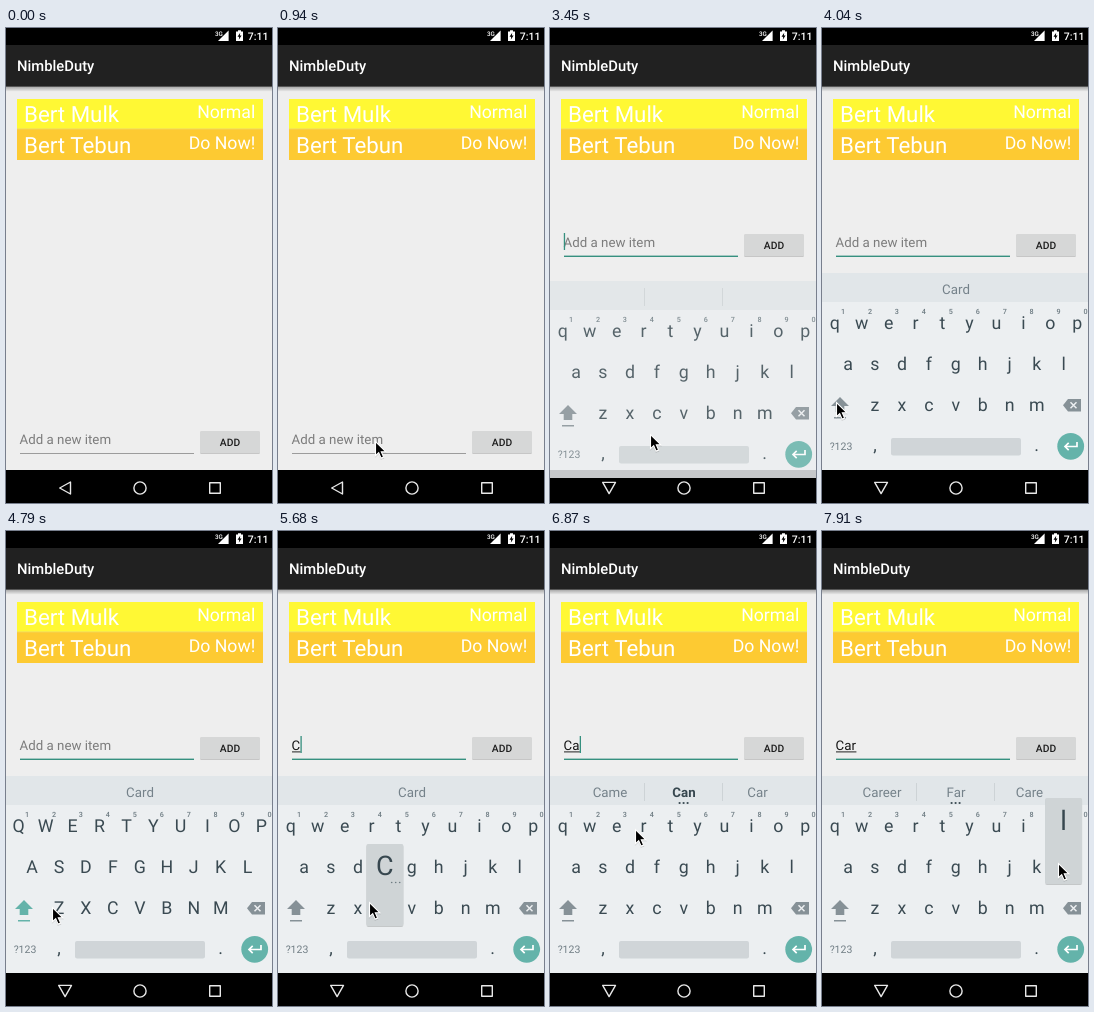
An HTML page that plays this animation: 266x475 px, repeating every 8000 ms.

```html
<!DOCTYPE html>
<html lang="en">
<head>
<meta charset="utf-8">
<title>To-do list</title>
<style>
  html, body { margin: 0; width: 100%; height: 100%; overflow: hidden; background: #eee; }
  svg { display: block; width: 100vw; height: 100vh; font-family: Roboto, "Noto Sans", sans-serif; text-rendering: geometricPrecision; }
  .mid { text-anchor: middle; }
  .end { text-anchor: end; }
  .med { font-weight: 500; }
  .key { font-size: 17.8px; fill: #3a4a52; text-anchor: middle; }
  .digit { font-size: 7.2px; font-weight: 500; fill: #6c7a81; text-anchor: middle; }
  .hint { font-size: 13.3px; fill: #75828a; text-anchor: middle; }
  .nav { fill: none; stroke: #e8e8e8; stroke-width: 1.4; stroke-linejoin: round; }
</style>
</head>
<body>
<svg viewBox="0 0 266 475" preserveAspectRatio="none">
  <defs>
    <linearGradient id="shade" x2="0" y2="1">
      <stop stop-color="#000" stop-opacity=".3"/>
      <stop offset="1" stop-color="#000" stop-opacity="0"/>
    </linearGradient>
    <filter id="soft" x="-20%" y="-20%" width="140%" height="140%">
      <feDropShadow dx="0" dy=".6" stdDeviation=".7" flood-opacity=".28"/>
    </filter>
  </defs>
  <rect width="266" height="475" fill="#eee"/>

  <!-- status and title bars -->
  <rect width="266" height="18" fill="#000"/>
  <rect y="17" width="266" height="41.7" fill="#212121"/>
  <rect y="58.7" width="266" height="5" fill="url(#shade)"/>
  <g fill="#fff">
    <path d="M222.6 2.5V13H212Z"/>
    <text class="med" x="209" y="7.6" font-size="6.3">3G</text>
    <path d="M230 3.5H232V2.2H235V3.5H237V13H230Z"/>
    <path d="M234.2 4.8L231.5 8.8H233.2L232.8 11.8L235.6 7.6H233.9Z" fill="#000"/>
    <text class="med" x="241.7" y="12" font-size="10.5">7:11</text>
    <text class="med" x="11" y="43" font-size="14.8">NimbleDuty</text>
  </g>

  <!-- list -->
  <rect x="11" y="71" width="246" height="30" fill="#fff834"/>
  <rect x="11" y="101" width="246" height="31" fill="#fdca32"/>
  <rect x="11" y="100.5" width="246" height=".8" fill="#eed86a"/>
  <g fill="#fff">
    <g font-size="22.3"><text x="18" y="94.4">Bert Mulk</text><text x="18" y="125.2">Bert Tebun</text></g>
    <g class="end" font-size="17.7"><text x="249.3" y="90">Normal</text><text x="249.3" y="120.8">Do Now!</text></g>
  </g>

  <!-- entry row -->
  <g id="entry">
    <text id="holder" x="13.6" y="415.8" font-size="13.3" fill="#7c7c7c">Add a new item</text>
    <text id="typed" x="13.6" y="415.8" font-size="13.3" fill="#161616"></text>
    <rect id="compose" x="14" y="417.4" height="1" fill="#222"/>
    <rect id="caret" y="402" width="1.3" height="17" fill="#36907f"/>
    <rect id="line" x="14" width="174"/>
    <rect x="194" y="403" width="60" height="22" rx="1.5" fill="#d6d7d7" filter="url(#soft)"/>
    <text class="mid med" x="224" y="418" font-size="10.3" fill="#1c1c1c">ADD</text>
  </g>

  <!-- navigation bar -->
  <rect y="442" width="266" height="33" fill="#000"/>
  <path id="back" class="nav"/>
  <circle class="nav" cx="134" cy="460" r="6.1"/>
  <rect class="nav" x="203.7" y="454.7" width="10.6" height="10.6"/>

  <!-- keyboard -->
  <g id="board">
    <rect y="245" width="266" height="197" fill="#eceff1"/>
    <rect y="245" width="266" height="29" fill="#e1e6e9"/>
    <path id="split" d="M94.5 252V270M172.5 252V270" stroke="#cdd3d6"/>
    <g id="hints"></g>
    <g id="more" fill="#3a4a52"><circle cx="129.6" cy="272" r="1.1"/><circle cx="133.6" cy="272" r="1.1"/><circle cx="137.6" cy="272" r="1.1"/></g>
    <rect id="press" x="1" y="360" width="34" height="36" fill="#d3d9dc"/>
    <g id="keys"></g>
    <path id="shift" d="M18 369L27 378H22.3V384H13.7V378H9ZM12 389H24V390.4H12Z"/>
    <path d="M241 377.3L246 371H259V383.6H246Z" fill="#869197"/>
    <path d="M248.5 374.3L254.5 380.3M254.5 374.3L248.5 380.3" stroke="#eceff1" stroke-width="1.5"/>
    <text class="mid" x="19" y="422" font-size="10.5" fill="#717e85">?123</text>
    <text class="key" x="53" y="423.3">,</text>
    <rect x="69" y="410" width="130" height="17.5" rx="2" fill="#d0d5d8"/>
    <text class="key" x="214.5" y="423.3">.</text>
    <circle cx="248.7" cy="418.3" r="13.4" fill="#64b3aa"/>
    <path d="M255 414V418.5H243M246.7 414.8L243 418.5L246.7 422.2" fill="none" stroke="#fff" stroke-width="1.7"/>
  </g>

  <g id="popup">
    <rect id="bubble" width="37" rx="2" fill="#cfd4d6" filter="url(#soft)"/>
    <text id="big" class="mid" font-size="27" fill="#37474f"></text>
    <g id="dots" fill="#6c7a81"><circle cx="-4" r=".8"/><circle r=".8"/><circle cx="4" r=".8"/></g>
  </g>

  <path id="pointer" d="M0 0V14L3.2 11L5.600 16.500L8.100 15.500L5.800 10.100H10.200Z" fill="#000" stroke="#fff" stroke-width="1.100" filter="url(#soft)"/>
</svg>
<script>
const LOOP = 8000, START = 1955, STEP = 148.75;
const ROWS = ["qwertyuiop", "asdfghjkl", "zxcvbnm"];
const ROW_X = [12.7, 26, 53], PITCH = 26.95, ROW_H = 41;
const el = id => document.getElementById(id);
const show = (id, on) => el(id).setAttribute("visibility", on ? "inherit" : "hidden");

function set(id, attrs) {
  for (const name in attrs) el(id).setAttribute(name, attrs[name]);
}

function addText(parent, cls, x, y, text) {
  const node = document.createElementNS("http://www.w3.org/2000/svg", "text");
  node.setAttribute("class", cls);
  node.setAttribute("x", x);
  node.setAttribute("y", y);
  node.textContent = text;
  el(parent).append(node);
  return node;
}

const keys = ROWS.flatMap((row, r) => [...row].map((letter, i) => {
  const x = ROW_X[r] + PITCH * i;
  if (r === 0) addText("keys", "digit", x + 8.3, 286.3, (i + 1) % 10);
  return { letter, x, r, node: addText("keys", "key", x, 301.4 + ROW_H * r, letter) };
}));
const hints = [60, 134, 207.5].map(x => addText("hints", "hint", x, 265.6, ""));

// Pointer path: step, x, y
const PATH = [
  [-1, 97, 413], [4, 139, 402], [8, 139, 402], [10, 100, 406], [14, 14, 374],
  [17, 14, 374], [19, 46, 376], [22, 91, 371], [26, 91, 371], [29, 22, 332],
  [31, 22, 332], [33, 85, 298], [34, 89, 294], [36, 89, 294], [39, 236, 332], [40, 236, 332]
];
// Step of press, letter on the key, letter in the bubble
const PRESSES = [[24, "c", "C"], [29, "a", "a"], [35, "r", "r"], [40, "l", "l"]];
const TYPED = [[25, "C"], [30, "Ca"], [36, "Car"]];
const HINTS = [
  [0, ["", "", ""]], [12, ["", "Card", ""]], [26, ["Call", "C", "Can"]],
  [31, ["Came", "Can", "Car"]], [37, ["Career", "Far", "Care"]]
];
const latest = (list, k) => list.filter(item => item[0] <= k).pop();

function pointerAt(t, k) {
  if (t < 500) return null;
  if (t < 650) return [98, 418];
  if (t < 940) return [98, 414];
  if (k < 0) return [97, 413];
  const i = Math.max(1, PATH.findIndex(p => p[0] >= k));
  const a = PATH[i - 1], b = PATH[i];
  const f = (k - a[0]) / (b[0] - a[0]);
  return [1, 2].map(n => a[n] + (b[n] - a[n]) * f);
}

function drawEntry(k) {
  const raised = k >= 9, focus = k >= 6;
  const entry = latest(TYPED, k);
  const since = entry ? entry[0] : Math.min(k, 8);
  const text = entry ? entry[1] : "";
  set("entry", { transform: `translate(0 ${raised ? -197 : 0})` });
  show("holder", !text);
  el("typed").textContent = text;
  const width = text ? el("typed").getComputedTextLength() : 0;
  show("compose", text);
  set("compose", { width });
  set("caret", { x: 13.8 + width });
  show("caret", focus && (k - since) * STEP % 1000 < 500);
  set("line", focus
    ? { y: 424.6, height: 1.4, fill: "#36907f" }
    : { y: 425, height: 1, fill: "#9c9c9c" });
  set("back", { d: raised ? "M52.7 454.4H65.5L59.1 465.6Z" : "M64.5 454V466L53.7 460Z" });
}

function drawBoard(k) {
  show("board", k >= 9);
  const rise = Math.max(0, 11 - k);
  set("board", { transform: `translate(0 ${rise * 8})`, opacity: [1, .84, .4][rise] ?? 0 });

  const caps = k >= 17 && k < 25;
  for (const key of keys) key.node.textContent = caps ? key.letter.toUpperCase() : key.letter;
  show("press", k === 16);
  set("shift", { fill: caps ? "#64b3aa" : "#869197" });

  const words = (latest(HINTS, k) || HINTS[0])[1];
  hints.forEach((node, i) => { node.textContent = words[i]; });
  const strong = k >= 26 && k < 37;
  hints[1].style.cssText = strong ? "font-weight:700;fill:#37474f" : "";
  show("split", k < 12 || k >= 26);
  show("more", k >= 26);
}

function drawPopup(k) {
  const press = PRESSES.find(p => k === p[0] || k === p[0] + 1);
  show("popup", press);
  if (!press) return;
  const first = k === press[0];
  const key = keys.find(item => item.letter === press[1]);
  const top = 231 + ROW_H * key.r - (first ? 5 : 0);
  set("bubble", { x: key.x - 18.5, y: top, height: first ? 86 : 82 });
  set("big", { x: key.x, y: top + (first ? 31.5 : 30.5) });
  el("big").textContent = press[2];
  set("dots", { transform: `translate(${key.x + 10.8} ${top + 38.5})` });
  show("dots", press[1] !== "l");
}

function draw(t) {
  const k = t < START ? -1 : Math.floor((t - START) / STEP);
  drawEntry(k);
  drawBoard(k);
  drawPopup(k);
  const at = pointerAt(t, k);
  show("pointer", at);
  if (at) set("pointer", { transform: `translate(${at[0] + .5} ${at[1] + .6})` });
}

const began = performance.now();
function tick() {
  draw((performance.now() - began) % LOOP);
  requestAnimationFrame(tick);
}
tick();
</script>
</body>
</html>
```
